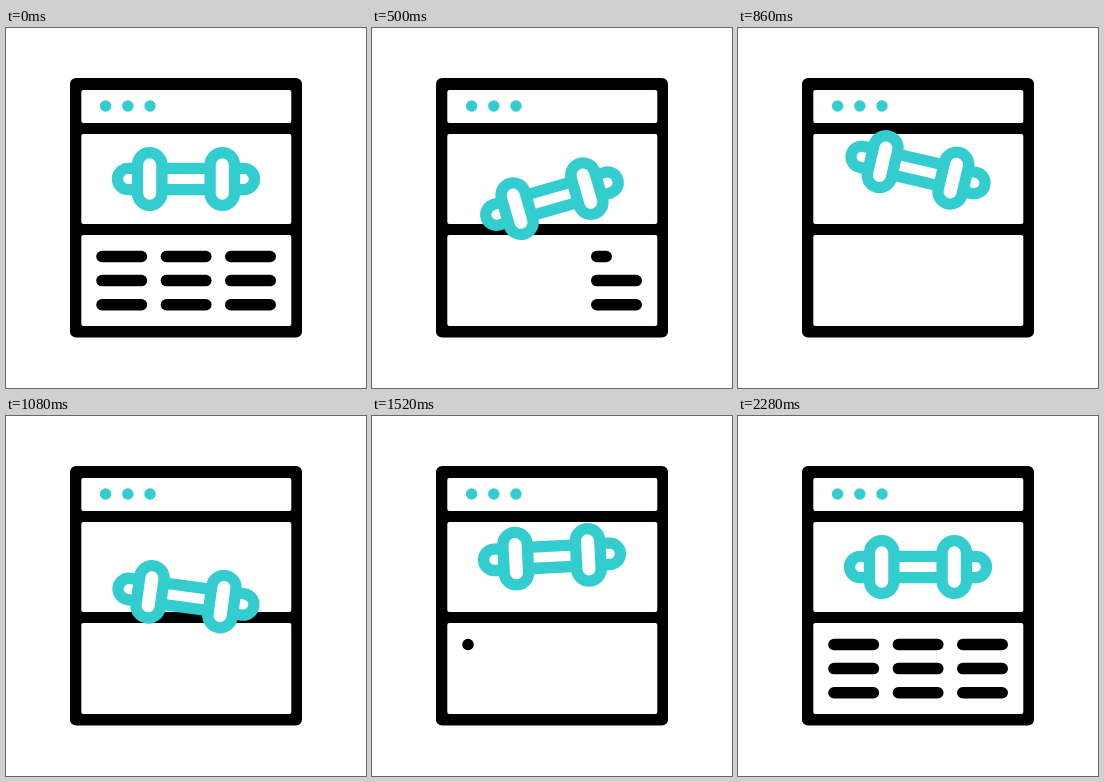
An HTML page with a canvas for the animation above (2400 ms loop, 360 px wide and 360 px high).

```html
<!DOCTYPE html>
<html lang="en">
<head>
<meta charset="utf-8">
<title>Fitness page icon</title>
<style>
html, body { margin: 0; width: 100%; height: 100%; overflow: hidden; background: #fff; }
canvas { display: block; width: 360px; height: 360px; }
</style>
</head>
<body>
<canvas id="stage" width="360" height="360"></canvas>
<script>
const ctx = document.getElementById('stage').getContext('2d');
const LOOP = 2400;
const TEAL = '#33cdcf';

// [time in ms, value]
const LIFT = [[0, 0], [380, 31.5], [760, -18], [1140, 33], [1520, -10.2], [1900, 12], [2170, 0]];
const TILT = [[0, 0], [190, 15], [570, -19], [930, 16.5], [1330, -11], [1700, 4.3], [2000, -1.5], [2170, 0]];

const clamp = v => Math.min(1, Math.max(0, v));
const smooth = u => u * u * (3 - 2 * u);
const cubic = u => u < 0.5 ? 4 * u ** 3 : 1 - 4 * (1 - u) ** 3;

function valueAt(keys, t) {
  const next = keys.findIndex(key => key[0] > t);
  if (next < 0) return keys[keys.length - 1][1];
  const [t0, v0] = keys[next - 1], [t1, v1] = keys[next];
  return v0 + (v1 - v0) * smooth((t - t0) / (t1 - t0));
}

function box(x, y, w, h, r, fill, stroke) {
  ctx.beginPath();
  ctx.roundRect(x, y, w, h, r);
  if (fill) { ctx.fillStyle = fill; ctx.fill(); }
  if (stroke) { ctx.strokeStyle = stroke; ctx.stroke(); }
}

function drawWindow() {
  box(64, 50, 232, 259.5, 6, '#000');
  for (const [y, h] of [[62, 33], [106, 90], [207, 91]]) box(75.3, y, 210, h, 2, '#fff');
  ctx.fillStyle = TEAL;
  for (const x of [99.6, 121.8, 144]) {
    ctx.beginPath();
    ctx.arc(x, 78, 5.7, 0, 2 * Math.PI);
    ctx.fill();
  }
}

// Text rows vanish one after another, column by column, then return in the same order.
function drawRows(t) {
  const erasing = t < 1200;
  const done = 9 * cubic(clamp(erasing ? (t - 30) / 780 : (t - 1500) / 760));
  ctx.strokeStyle = '#000';
  ctx.lineWidth = 11.5;
  ctx.lineCap = 'round';
  for (let i = 0; i < 9; i++) {
    const part = clamp(done - i);
    const shown = erasing ? 1 - part : part;
    if (shown <= 0) continue;
    const x = 96 + 64.4 * Math.floor(i / 3), y = 228.5 + 24.1 * (i % 3);
    ctx.beginPath();
    ctx.moveTo(x, y);
    ctx.lineTo(x + 39.4 * shown + 0.01, y);
    ctx.stroke();
  }
}

function drawDumbbell(t) {
  ctx.save();
  ctx.translate(180, 151 + valueAt(LIFT, t));
  ctx.rotate(valueAt(TILT, t) * Math.PI / 180);
  ctx.lineWidth = 11.3;
  box(-68.5, -10.7, 137, 21.4, 10.7, '#fff', TEAL);
  for (const x of [-36.3, 36.3]) box(x - 12.2, -26.3, 24.4, 52.6, 12.2, '#fff', TEAL);
  ctx.restore();
}

function draw() {
  const t = performance.now() % LOOP;
  ctx.fillStyle = '#fff';
  ctx.fillRect(0, 0, 360, 360);
  drawWindow();
  drawRows(t);
  drawDumbbell(t);
  requestAnimationFrame(draw);
}
draw();
</script>
</body>
</html>
```
